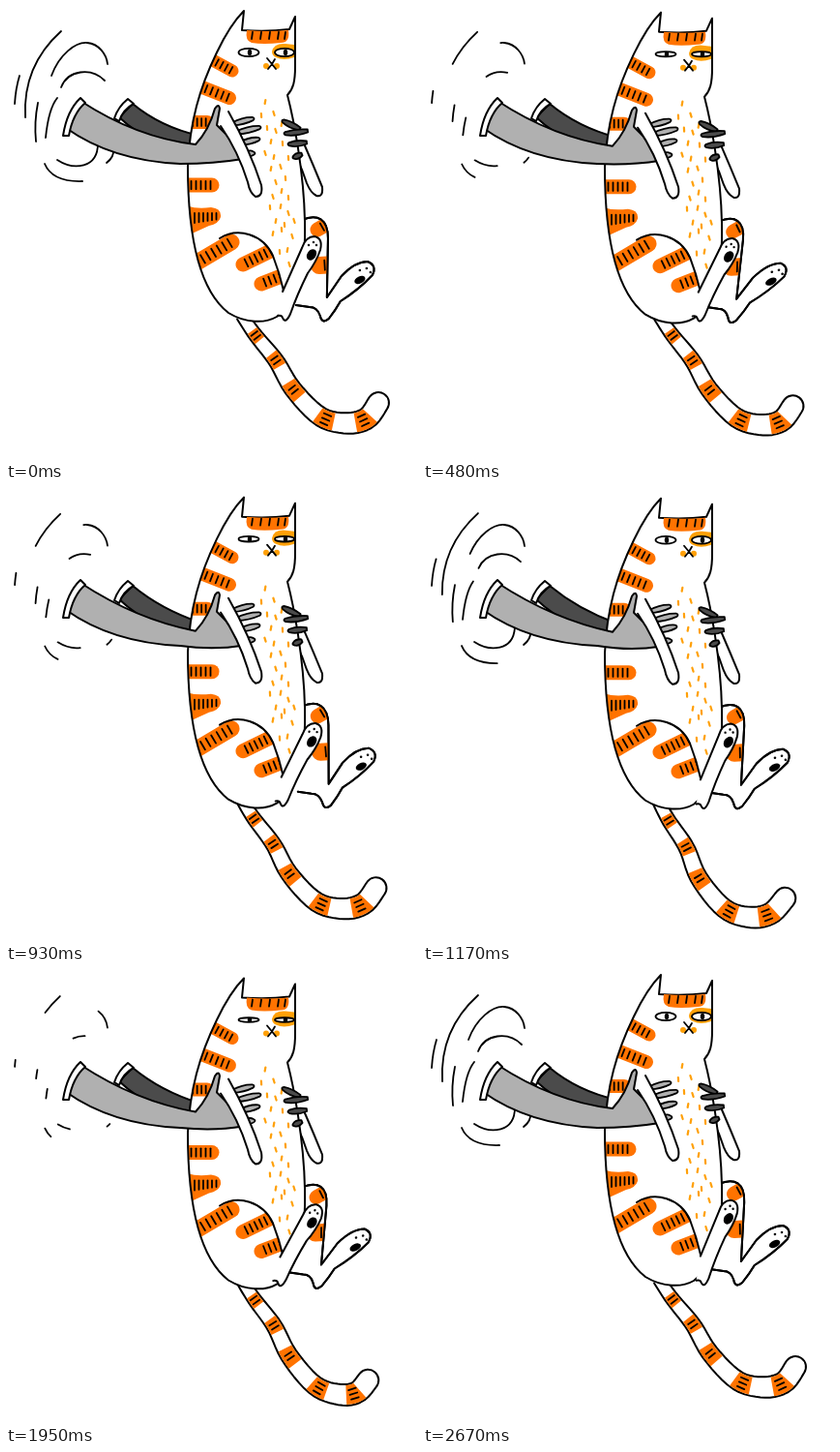
An HTML page with a canvas for the animation above (2700 ms loop, 425 px wide and 469 px high).

```html
<!DOCTYPE html>
<html lang="en">
<head>
<meta charset="utf-8">
<title>Cat</title>
<style>
html, body { margin: 0; width: 100%; height: 100%; overflow: hidden; background: #fff; }
canvas { display: block; }
</style>
</head>
<body>
<canvas id="stage" width="425" height="469"></canvas>
<script>
const ctx = document.getElementById('stage').getContext('2d');
const LOOP = 2700, TAU = Math.PI * 2;
const ORANGE = '#ff7300', AMBER = '#ffa008', GREY = '#b0b0b0', DARK = '#4b4b4b';

const BODY = new Path2D(`M246 5 L244 25 Q270 27 293 24 L299 11 L299 62 C299 78 297 86 291 92
  C297 115 308 170 309 222 C310 270 305 300 280 321 C268 328 248 328 230 317
  C198 292 188 230 188 165 C190 120 200 85 218 48 C228 27 236 15 246 5 Z`);
const THIGH = 'M221 240 C240 228 266 236 276 258 Q283 276 287 294';
const THIGH_AREA = new Path2D(THIGH + ' L270 330 H180 V240 Z');
const FAR_LEG = new Path2D(`M306 221 C322 214 333 220 333 240 L332 301 L347 279
  Q361 264 374 264 Q384 268 379 278 Q365 293 346 305 Q341 314 334 323
  Q327 329 325 320 Q322 311 314 311 L300 309`);
const NEAR_LEG = new Path2D(`M286 295 L306 250 Q310 238 319 238 Q328 240 325 252
  Q321 264 312 276 Q301 298 294 318 Q289 329 286 322 Q285 319 281 320`);
const FAR_PAW = new Path2D(`M308 142 Q318 165 327 187 Q328 198 321 196 Q315 193 311 183 Q307 170 300 156`);
const NEAR_PAW = new Path2D(`M230 109 Q252 148 264 185 Q266 197 258 197 Q252 193 250 182 Q240 150 222 124`);

// Belly hairs, as x, y pairs
const HAIRS = [268,99, 264,113, 277,111, 285,122, 270,126, 279,129, 274,140, 286,142,
  268,152, 277,156, 292,157, 284,166, 274,168, 289,178, 279,182, 285,191, 292,198,
  276,197, 284,207, 273,208, 292,214, 279,222, 288,226, 298,222, 276,235, 285,231,
  296,238, 291,252, 283,254, 293,267];

const TAIL_UP = [[244,320], [258,340], [279,366], [297,396], [325,424], [352,431], [373,426], [385,410]];
const TAIL_DOWN = [[242,322], [253,344], [270,373], [280,406], [303,440], [326,453], [346,453], [361,441]];
const TAIL_STRIPES = [[.145, .03], [.285, .032], [.43, .036], [.6, .042], [.83, .058]];

// Speed lines: path and where the line shrinks to (0 start, 1 end)
const LINES = [
  ['M14 72 Q10 85 9 101', .95], ['M57 26 Q17 62 20 115', .02],
  ['M47 72 C55 50 72 37 84 38 S104 50 105 60', .99], ['M33 100 Q29 120 31 140', .1],
  ['M57 84 C64 66 88 63 102 77', .45], ['M53 95 Q44 106 41 136', .9],
  ['M40 163 Q48 182 79 181', .02], ['M53 159 C70 170 95 168 95 142', .02],
  ['M104 162 Q112 156 111 148', .05]
].map(([d, anchor]) => {
  const el = document.createElementNS('http://www.w3.org/2000/svg', 'path');
  el.setAttribute('d', d);
  return { path: new Path2D(d), length: el.getTotalLength(), anchor };
});

function shape(path, fill, width = 2) {
  if (typeof path === 'string') path = new Path2D(path);
  if (fill) { ctx.fillStyle = fill; ctx.fill(path); }
  if (width) { ctx.strokeStyle = '#000'; ctx.lineWidth = width; ctx.stroke(path); }
}

function line(x1, y1, x2, y2, width = 2, color = '#000') {
  ctx.strokeStyle = color;
  ctx.lineWidth = width;
  ctx.beginPath();
  ctx.moveTo(x1, y1);
  ctx.lineTo(x2, y2);
  ctx.stroke();
}

function oval(x, y, rx, ry, color = '#000', angle = 0) {
  ctx.fillStyle = color;
  ctx.beginPath();
  ctx.ellipse(x, y, rx, ry, angle, 0, TAU);
  ctx.fill();
}

function stripe(x1, y1, x2, y2, width, ticks) {
  line(x1, y1, x2, y2, width, ORANGE);
  const dx = x2 - x1, dy = y2 - y1, len = Math.hypot(dx, dy), h = width * .28;
  for (let i = 0; i < ticks; i++) {
    const u = (i + .7) / ticks, x = x1 + dx * u, y = y1 + dy * u;
    line(x + dy / len * h, y - dx / len * h, x - dy / len * h, y + dx / len * h, 1.8);
  }
}

// Runs from the root to a rounded tip
function finger(x1, y1, x2, y2, color) {
  ctx.save();
  ctx.translate(x1, y1);
  ctx.rotate(Math.atan2(y2 - y1, x2 - x1));
  const n = Math.hypot(x2 - x1, y2 - y1);
  shape(`M0 -1.5 Q${n / 2} -4.5 ${n - 2} -1.7 Q${n + 1} 0 ${n - 2} 1.7 Q${n / 2} 4 0 1.5 Z`, color, 1.8);
  ctx.restore();
}

function curveAt(pts, u) {
  const f = u * (pts.length - 1), i = Math.min(Math.floor(f), pts.length - 2), t = f - i;
  const at = k => pts[Math.max(0, Math.min(pts.length - 1, k))];
  return [0, 1].map(c => {
    const [a, b, d, e] = [at(i - 1)[c], at(i)[c], at(i + 1)[c], at(i + 2)[c]];
    return b + .5 * t * (d - a + t * (2 * a - 5 * b + 4 * d - e + t * (3 * (b - d) + e - a)));
  });
}

// The swing reaches the tip later than the root
function tailSwing(t, u) {
  const wave = .5 + .5 * Math.cos(TAU * (t - 1350 - 210 * u) / LOOP);
  return wave ** 3.8 + .14 * u * Math.exp(-(((t - 400) / 150) ** 2));
}

function tail(t) {
  const pts = TAIL_UP.map((p, i) => {
    const s = tailSwing(t, i / (TAIL_UP.length - 1));
    return p.map((v, c) => v + (TAIL_DOWN[i][c] - v) * s);
  });
  const edge = (u, side, inset = 0) => {
    const [x, y] = curveAt(pts, u), [ax, ay] = curveAt(pts, Math.max(0, u - .01));
    const [bx, by] = curveAt(pts, Math.min(1, u + .01));
    const a = Math.atan2(by - ay, bx - ax), r = (6 + 5 * Math.min(1, u * 1.3) - inset) * side;
    return [x - Math.sin(a) * r, y + Math.cos(a) * r, a];
  };
  const band = (from, to, inset, capped) => {
    const p = new Path2D(), n = 40;
    for (let i = 0; i <= n; i++) p.lineTo(...edge(from + (to - from) * i / n, 1, inset).slice(0, 2));
    if (capped) {
      const a = edge(to, 1)[2];
      p.arc(...curveAt(pts, to), 11, a + Math.PI / 2, a - Math.PI / 2, true);
    }
    for (let i = n; i >= 0; i--) p.lineTo(...edge(from + (to - from) * i / n, -1, inset).slice(0, 2));
    return p;
  };
  shape(band(0, 1, 0, true), '#fff');
  TAIL_STRIPES.forEach(([u, half], n) => {
    shape(band(u - half, u + half, 1), ORANGE, 0);
    const [x, y] = curveAt(pts, u), a = edge(u, 1)[2], ticks = n < 3 ? 2 : 3;
    ctx.save();
    ctx.translate(x, y);
    ctx.rotate(n < 3 ? a - Math.PI / 2 : a);
    for (let i = 0; i < ticks; i++) {
      const v = (i - (ticks - 1) / 2) * 5;
      line(-4, v, 4, v, 1.8);
    }
    ctx.restore();
  });
}

function farLeg(kick) {
  ctx.save();
  // Shear about the hip
  ctx.transform(1, 0, -kick / 108, 1, kick / 108 * 218, 0);
  shape(FAR_LEG, '#fff');
  ctx.save();
  ctx.clip(FAR_LEG);
  stripe(322, 231, 336, 223, 15, 2);
  stripe(324, 268, 340, 267, 18, 2);
  ctx.restore();
  shape(FAR_LEG);
  oval(366, 283, 6, 3.6, '#000', -.45);
  for (const [x, y] of [[366, 273], [373, 271], [377, 275]]) oval(x, y, 1.3, 1.3);
  ctx.restore();
}

function nearLeg(tilt) {
  ctx.save();
  ctx.translate(310, 262);
  ctx.rotate(tilt);
  ctx.translate(-310, -262);
  shape(NEAR_LEG, '#fff');
  oval(316, 257, 4.6, 6.2, '#000', .6);
  for (const [x, y] of [[313, 247], [318, 244], [321, 247]]) oval(x, y, 1.2, 1.2);
  ctx.restore();
}

function eye(x, r, open) {
  ctx.save();
  ctx.beginPath();
  ctx.ellipse(x, 48, r, open, 0, 0, TAU);
  ctx.fillStyle = '#fff';
  ctx.fill();
  ctx.strokeStyle = '#000';
  ctx.lineWidth = 1.8;
  ctx.stroke();
  ctx.clip();
  oval(x + 1, 48, 2.2, 3.2);
  ctx.restore();
}

function face(open) {
  shape('M249 25 Q270 27 292 25 Q294 38 284 38 Q266 40 254 38 Q247 36 249 25 Z', ORANGE, 0);
  for (const x of [255, 264, 273, 282, 289]) line(x, 27, x - 1, 34, 1.8);
  shape('M275 47 Q277 38 289 39 L298 40 V53 Q287 57 279 53 Q275 51 275 47 Z', AMBER, 0);
  oval(269, 62, 3, 3, AMBER);
  oval(280, 62, 3, 3, AMBER);
  eye(251, 10.5, open);
  eye(288, 10, open);
  shape('M270 54 L275 60 L278 55 M275 60 L271 65 M275 60 L279 65', null, 1.8);
}

function body(open) {
  shape(BODY, '#fff', 0);
  ctx.save();
  ctx.clip(BODY);
  stripe(210, 54, 234, 67, 13, 5);
  stripe(203, 84, 231, 95, 14, 5);
  stripe(190, 120, 208, 120, 14, 4);
  stripe(188, 185, 213, 185, 15, 5);
  shape('M186 206 Q196 210 212 208 Q223 209 222 218 Q220 225 210 227 L186 238 Z', ORANGE, 0);
  for (let i = 0; i < 6; i++) line(195 + i * 4.5, 214, 195 + i * 4.5, 224 - i * .7, 1.8);
  ctx.clip(THIGH_AREA);
  stripe(194, 267, 233, 244, 17, 7);
  stripe(245, 267, 280, 250, 15, 7);
  stripe(264, 287, 290, 277, 15, 5);
  ctx.restore();
  for (let i = 0; i < HAIRS.length; i += 2) {
    const x = HAIRS[i], y = HAIRS[i + 1], lean = (i % 6 - 1.5) * .25;
    line(x - lean, y - 2, x + lean, y + 2, 2.2, AMBER);
  }
  shape(BODY);
  shape(THIGH);
}

function farArm(bob) {
  shape(`M131 101 Q160 125 200 ${134 + bob} V${150 + bob} Q150 146 117 115 Z`, DARK);
  shape('M126 96 L132 101 Q121 107 117 119 L112 116 Q116 104 126 96 Z', '#fff');
}

function nearArm(bob) {
  const y = v => v + bob;
  shape(`M77 98 Q135 136 196 ${y(143)} Q210 ${y(128)} 216 ${y(106)} Q220 ${y(100)} 221 ${y(106)}
    L218 ${y(123)} L228 ${y(133)} L245 ${y(158)} Q215 ${y(163)} 180 163 Q110 160 62 126 Z`, GREY);
  shape('M77 95 L82 100 Q69 111 65 134 L59 134 Q63 108 77 95 Z', '#fff');
}

function speedLines(t) {
  const wave = .5 + .5 * Math.cos(TAU * (t - 30) / 1350);
  const shown = Math.min(1, .17 + wave);
  ctx.strokeStyle = '#000';
  ctx.lineWidth = 1.8;
  for (const { path, length, anchor } of LINES) {
    ctx.setLineDash([length * shown, length * 2]);
    ctx.lineDashOffset = -length * (1 - shown) * anchor;
    ctx.stroke(path);
  }
  ctx.setLineDash([]);
}

function draw(t) {
  const bob = 3 - 3 * Math.cos(TAU * t / LOOP);
  const beat = t / 300;
  const kick = 4 - 6.5 * Math.cos(TAU * (beat - .15));
  const tilt = .04 + .07 * Math.cos(TAU * (beat - .35));
  const open = 3.2 + Math.cos(TAU * t / 1350);

  ctx.fillStyle = '#fff';
  ctx.fillRect(0, 0, 425, 469);
  ctx.lineCap = ctx.lineJoin = 'round';
  speedLines(t);
  farArm(bob);
  tail(t);

  ctx.save();
  ctx.translate(0, bob);
  farLeg(kick);
  shape(FAR_PAW, '#fff');
  body();
  face(open);
  nearLeg(tilt);
  for (const f of [[304, 127, 285, 118], [312, 129, 287, 132], [311, 141, 291, 143], [306, 153, 296, 157]])
    finger(...f, DARK);
  for (const f of [[234, 122, 257, 116], [238, 131, 264, 125], [242, 142, 263, 137], [246, 153, 258, 152]])
    finger(...f, GREY);
  ctx.restore();

  nearArm(bob);
  ctx.save();
  ctx.translate(0, bob);
  shape(NEAR_PAW, '#fff');
  ctx.restore();
}

const start = performance.now();
function tick() {
  const t = (performance.now() - start) % LOOP;
  draw(Math.floor(t / 30) * 30);
  requestAnimationFrame(tick);
}
tick();
</script>
</body>
</html>
```
